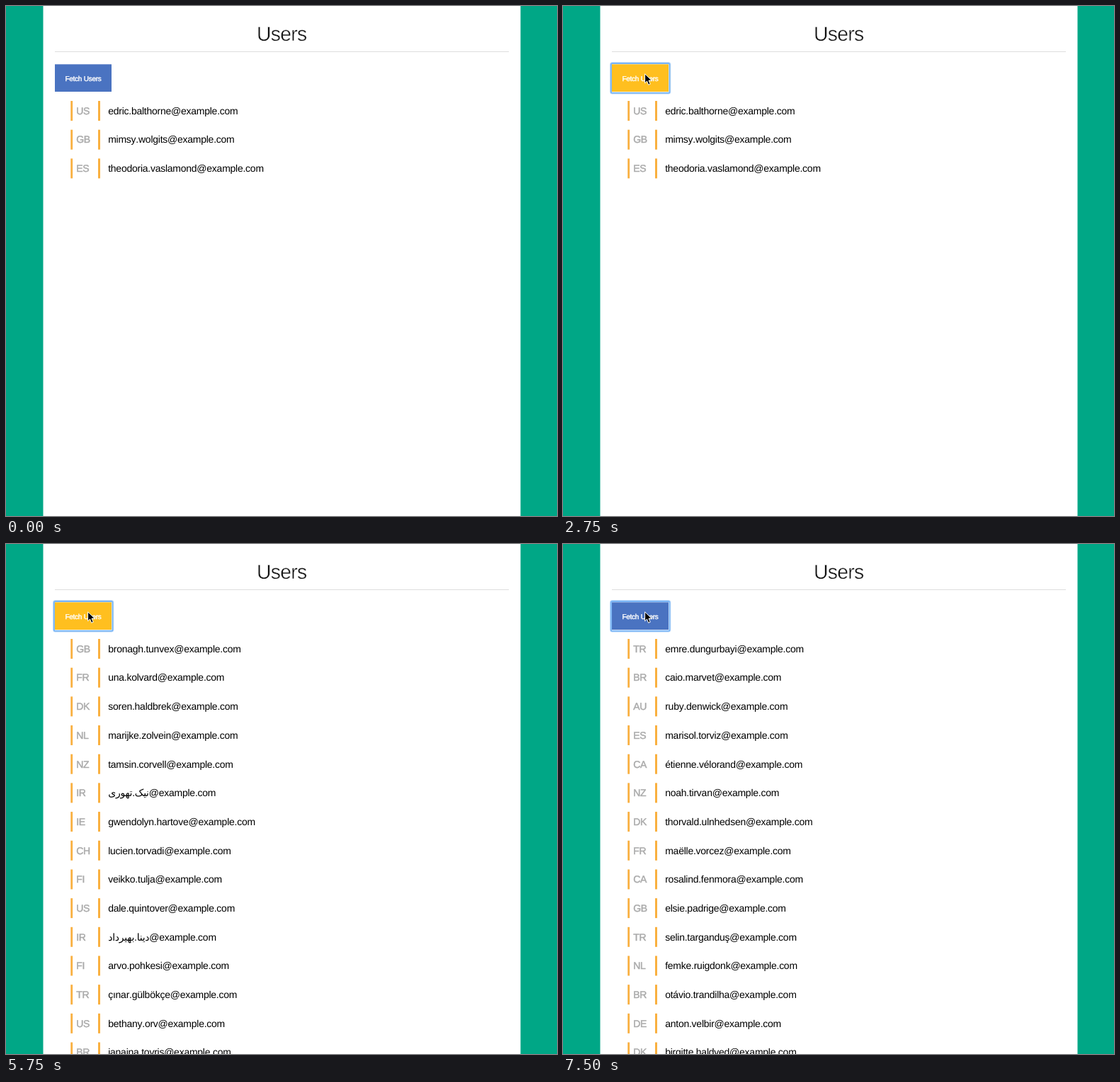
An HTML page for the animation above (8000 ms loop, 778x720 px).

```html
<!DOCTYPE html>
<html lang="en">
<head>
<meta charset="utf-8">
<title>Users</title>
<style>
  html, body { margin: 0; width: 778px; height: 720px; overflow: hidden; background: #00a786; }
  svg { display: block; font: 14px "Liberation Sans", Arial, "DejaVu Sans", sans-serif;
        letter-spacing: -.018em; font-kerning: none; text-rendering: geometricPrecision; }
  .title { font-size: 28.4px; letter-spacing: -.027em; fill: #111; stroke: #fff; stroke-width: .5px; }
  .label { font-size: 10px; fill: #fff; stroke: #fff; stroke-width: .4px; }
  .code { fill: #aaa; stroke: #aaa; stroke-width: .5px; }
  .bar { fill: #f9b040; }
</style>
</head>
<body>
<svg width="778" height="720" viewBox="0 0 778 720">
  <rect x="52.5" width="674" height="720" fill="#fff"/>
  <text class="title" x="389.2" y="49" text-anchor="middle">Users</text>
  <rect x="69" y="64" width="641" height="1" fill="#dedede"/>
  <g id="ring" fill="none" stroke="#7ab5f6">
    <rect x="66.6" y="79.6" width="85.2" height="44.4" rx="2.5" stroke-opacity=".5"/>
    <rect x="67.9" y="80.9" width="82.6" height="41.8" rx="1.5" stroke-width="2"/>
  </g>
  <rect id="button" x="69" y="82.3" width="80" height="38.7"/>
  <text class="label" x="109" y="106" text-anchor="middle">Fetch Users</text>
  <g id="list"></g>
  <path id="cursor" d="M.6.9V13.8L3.6 11 5.7 16.3 8.2 15.2 6 10.1H10.3Z" stroke="#fff"/>
</svg>
<script>
const LOOP = 8000, PITCH = 40.68;
const $ = id => document.getElementById(id);

const lists = [
  `US edric.balthorne
   GB mimsy.wolgits
   ES theodoria.vaslamond`,
  `GB bronagh.tunvex
   FR una.kolvard
   DK soren.haldbrek
   NL marijke.zolvein
   NZ tamsin.corvell
   IR نیک.تهوری
   IE gwendolyn.hartove
   CH lucien.torvadi
   FI veikko.tulja
   US dale.quintover
   IR دینا.بهیرداد
   FI arvo.pohkesi
   TR çınar.gülbökçe
   US bethany.orv
   BR janaina.tovris`,
  `TR emre.dungurbayi
   BR caio.marvet
   AU ruby.denwick
   ES marisol.torviz
   CA étienne.vélorand
   NZ noah.tirvan
   DK thorvald.ulnhedsen
   FR maëlle.vorcez
   CA rosalind.fenmora
   GB elsie.padrige
   TR selin.targanduş
   NL femke.ruigdonk
   BR otávio.trandilha
   DE anton.velbir
   DK birgitte.haldved`
].map(text => text.split("\n").map(line => line.trim().split(" ")));

const row = ([code, user], i) => `<g transform="translate(0 ${i * PITCH})">
  <rect class="bar" x="91.3" y="134" width="2.8" height="28"/>
  <rect class="bar" x="130" y="134" width="3" height="28"/>
  <text class="code" x="99.2" y="152.8">${code}</text>
  <text x="144.2" y="152.8">${user}@example.com</text></g>`;

// Start time, x, y of each pointer position
const stops = [[1250, 166, 54], [1500, 148, 79], [1750, 126, 85], [2000, 115, 95]];
const within = (t, start, end) => t >= start && t < end;
const show = (id, on) => $(id).setAttribute("visibility", on ? "visible" : "hidden");

let shown = -1;
function draw(now) {
  const t = now % LOOP;
  const current = t < 3250 ? 0 : t < 6250 ? 1 : 2;
  if (current !== shown) {
    $("list").innerHTML = lists[current].map(row).join("");
    shown = current;
  }
  const pressed = within(t, 2750, 3000) || within(t, 5750, 6000);
  $("button").setAttribute("fill", pressed ? "#ffbf1f" : "#4a73c1");
  show("ring", t >= 2750);

  const stop = stops.filter(([start]) => t >= start).pop();
  show("cursor", stop);
  if (stop) $("cursor").setAttribute("transform", `translate(${stop[1]} ${stop[2]})`);
  requestAnimationFrame(() => draw(performance.now()));
}
draw(performance.now());
</script>
</body>
</html>
```
